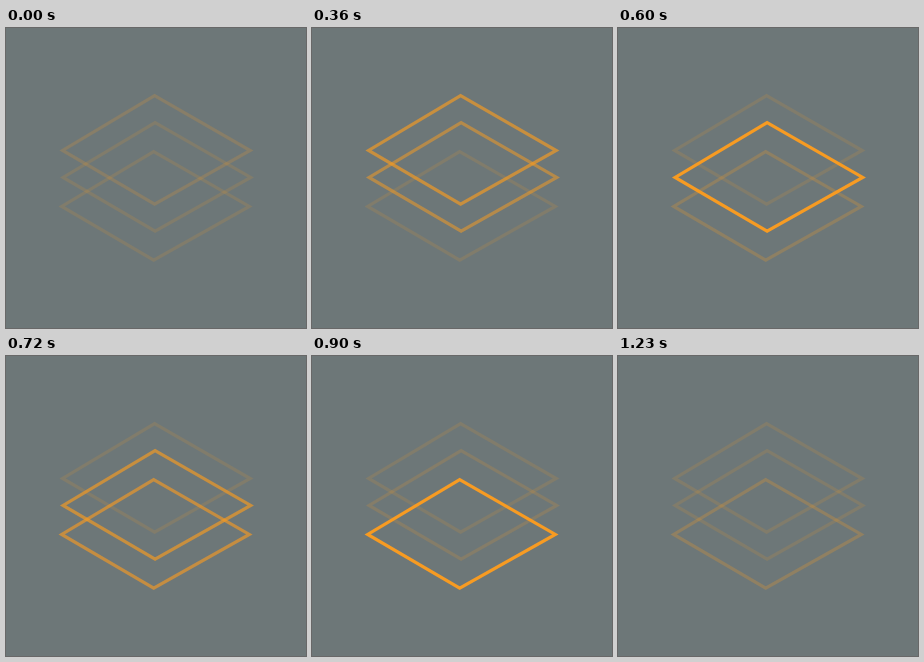
An HTML page for the animation above (1.26 s loop, 300 by 300 pixels).

```html
<!DOCTYPE html>
<html lang="en">
<head>
<meta charset="utf-8">
<title>Layers</title>
<style>
  html, body { margin: 0; width: 100%; height: 100%; overflow: hidden; background: #6d7778; }
  svg { display: block; width: 100vw; height: 100vh; }
  path { fill: none; stroke: #f79b22; stroke-width: 3.2; }
</style>
</head>
<body>
<svg viewBox="0 0 300 300"></svg>
<script>
const LOOP = 1260, STEP = 30;
const RISE = 260, FALL = 310, DIM = 0.14;

// apex of each sheet, and when its glow begins and ends
const sheets = [
  { x: 148.6, y: 67.7, from: -15, to: 550 },
  { x: 149.1, y: 94.6, from: 245, to: 910 },
  { x: 147.7, y: 123.6, from: 570, to: 1270 }
];

// ramps up, holds at full, ramps down
function glow({ from, to }, t) {
  const ramp = Math.min((t - from) / RISE, (to - t) / FALL, 1);
  return DIM + (1 - DIM) * Math.max(ramp, 0);
}

const svg = document.querySelector('svg');
for (const s of sheets) {
  s.path = document.createElementNS('http://www.w3.org/2000/svg', 'path');
  s.path.setAttribute('d', `M${s.x} ${s.y}l95.6 54.8l-95.6 53.7l-92 -53.7z`);
  svg.append(s.path);
}

const start = performance.now();
function draw() {
  const now = (performance.now() - start) % LOOP;
  const t = Math.floor(now / STEP) * STEP;
  for (const s of sheets) s.path.style.opacity = glow(s, t);
  requestAnimationFrame(draw);
}
draw();
</script>
</body>
</html>
```
